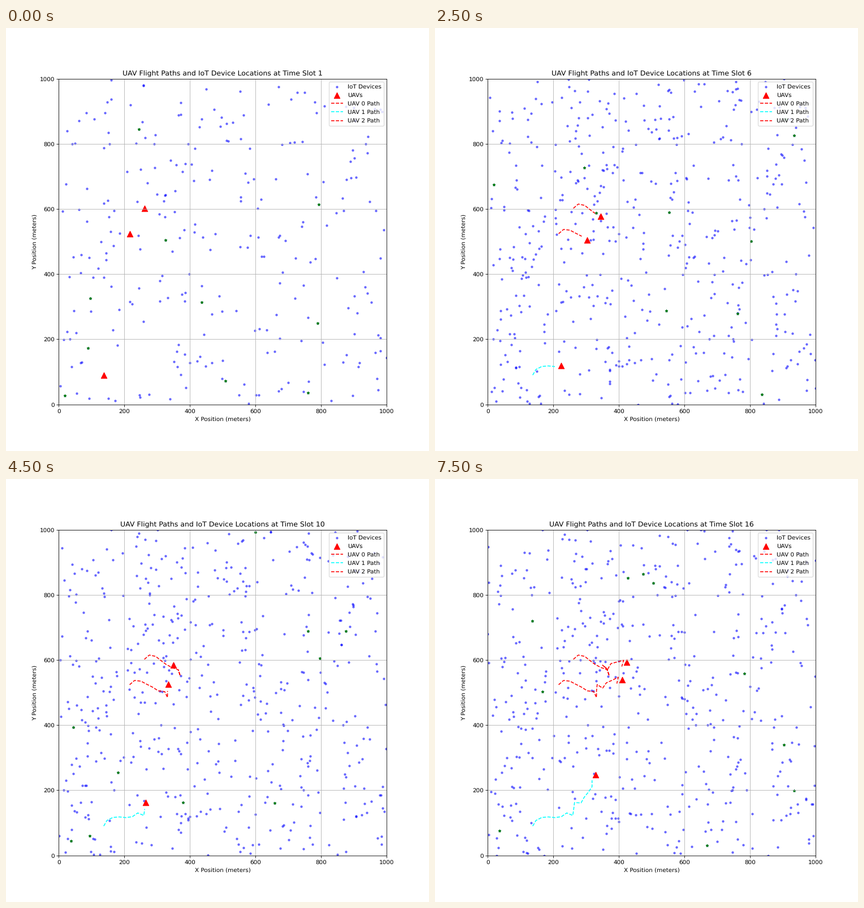
Write a matplotlib script that moves like this. It is 748 px wide and 748 px high and loops after 8000 ms.

```python
import numpy as np
import matplotlib.pyplot as plt
from matplotlib.animation import FuncAnimation

SLOTS = 16
SLOT_MS = 500
AREA = 1000    # metres
SPEED = 20     # metres flown per slot
DEVICES = 510
SELECTED = 10  # devices marked in each slot

# Each UAV: path colour, start point, heading in degrees for every move.
UAVS = [
    ("red", (261, 602),
     [41, -12, -39, -37, -28, -20, -70, 107, 137, -39, 60, 15, 15, -106, 40]),
    ("cyan", (137, 90),
     [60, 27, 5, -6, 8, 35, -23, 82, 83, -3, 61, 51, 56, 90, 57]),
    ("red", (216, 524),
     [41, -7, -28, -27, -33, -7, -65, 90, 84, -34, 55, 24, 27, -102, 38]),
]

plt.rcParams["text.hinting"] = "none"
rng = np.random.default_rng(11)


def fly(start, headings):
    """Positions reached at constant speed along the given headings."""
    a = np.radians(headings)
    moves = SPEED * np.column_stack([np.cos(a), np.sin(a)])
    return np.vstack([start, start + np.cumsum(moves, axis=0)])


def wander(step=4.0):
    """Random walks of all devices inside the area: (slot, device, xy)."""
    walk = [rng.uniform(0, AREA, (DEVICES, 2))]
    for _ in range(SLOTS - 1):
        move = rng.normal(0, step, (DEVICES, 2))
        walk.append(np.clip(walk[-1] + move, 0, AREA))
    return np.array(walk)


def active(i):
    """Number of devices seen so far: quick growth, then level."""
    return round(DEVICES * (1 - 0.48 * np.exp(-0.65 * i)))


walks = wander()
tracks = [fly(np.array(start), headings) for _, start, headings in UAVS]
picks = [rng.choice(active(i), SELECTED, replace=False) for i in range(SLOTS)]

fig, ax = plt.subplots(figsize=(10, 10), dpi=74.8)
fig.subplots_adjust(left=0.1248, right=0.9, bottom=0.1102, top=0.8802)
devices = ax.scatter([], [], s=10, c="blue", alpha=0.5, label="IoT Devices")
chosen = ax.scatter([], [], s=20, c="green", marker="*")
uavs = ax.scatter([], [], s=100, c="red", marker="^", label="UAVs")
paths = [ax.plot([], [], "--", color=color, label=f"UAV {k} Path")[0]
         for k, (color, _, _) in enumerate(UAVS)]

ax.set(xlim=(0, AREA), ylim=(0, AREA),
       xlabel="X Position (meters)", ylabel="Y Position (meters)")
title = ax.set_title("")
ax.legend(loc="upper right", labelspacing=0.53)
ax.grid(True)


def update(i):
    devices.set_offsets(walks[i, :active(i)])
    chosen.set_offsets(walks[i, picks[i]])
    uavs.set_offsets([track[i] for track in tracks])
    # The drawn path trails the vehicle by one slot.
    for line, track in zip(paths, tracks):
        line.set_data(*track[:i].T)
    title.set_text("UAV Flight Paths and IoT Device Locations "
                   f"at Time Slot {i + 1}")
    return [devices, chosen, uavs, title, *paths]


anim = FuncAnimation(fig, update, frames=SLOTS, interval=SLOT_MS,
                     repeat=True, repeat_delay=0, blit=False)
plt.show()
```
